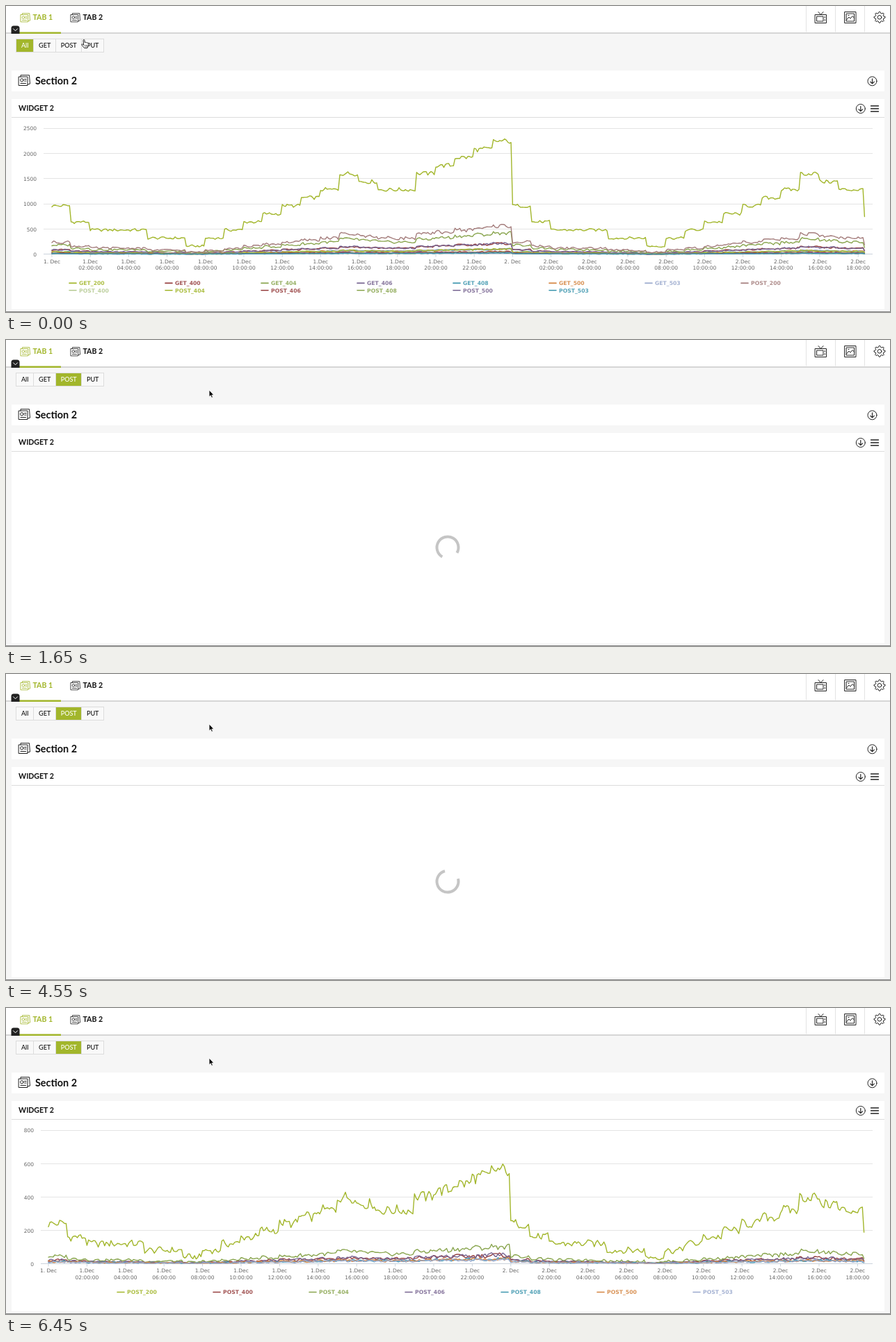
An HTML page that plays this animation: 1271x441 px, repeating every 6650 ms.

```html
<!DOCTYPE html>
<html lang="en">
<head>
<meta charset="utf-8">
<title>Dashboard filter</title>
<style>
  html, body { margin: 0; width: 100%; height: 100%; overflow: hidden; background: #f6f6f6; }
  svg { display: block; width: 100%; height: 100%; }
  text { font-family: Lato, "Open Sans", sans-serif; fill: #111; }
  .chart text { font: 7.5px "DejaVu Sans", Verdana, sans-serif; fill: #666; }
  .chart .key { font-weight: bold; font-size: 7.7px; fill-opacity: .88; }
  .line { fill: none; stroke: #222; stroke-linecap: round; stroke-linejoin: round; }
</style>
</head>
<body>
<svg id="stage" viewBox="0 0 1271 441" xmlns="http://www.w3.org/2000/svg"></svg>
<script>
const LOOP = 6650, STEP = 50;
const CLICK = 300, SPIN_SHOWN = 350, SPIN_START = 500, LOADED = 5450;
const REVEAL_START = 5434, REVEAL_TIME = 1000;
const GREEN = '#a2b62b';
const PALETTE = [GREEN, '#963f3f', '#89a54e', '#776491', '#3d96ae', '#d48440', '#9aa9cd', '#a47d7c', '#b5ca92'];
const stage = document.getElementById('stage');

function add(parent, tag, attrs, content) {
  const node = document.createElementNS('http://www.w3.org/2000/svg', tag);
  for (const key in attrs) node.setAttribute(key, attrs[key]);
  if (content !== undefined) node.textContent = content;
  parent.appendChild(node);
  return node;
}
const rect = (p, x, y, width, height, fill, more) => add(p, 'rect', { x, y, width, height, fill, ...more });
const path = (p, d, more) => add(p, 'path', { d, class: 'line', ...more });
const label = (p, x, y, content, more) => add(p, 'text', { x, y, ...more }, content);
const group = (p, x = 0, y = 0, more) => add(p, 'g', { transform: `translate(${x} ${y})`, ...more });
const show = (node, on) => node.setAttribute('visibility', on ? 'visible' : 'hidden');

// Page frame
function cardIcon(x, y, scale, color) {
  const g = group(stage, 0, 0, { transform: `translate(${x} ${y}) scale(${scale})` });
  const pen = { style: `stroke:${color}`, 'stroke-width': 1 };
  path(g, 'M1 3H13.5V15.5H1ZM3.5 3V.7L16 .7 17 13.2 13.5 14M9 6.5H11.5M9 9H11.5M3.5 12.5H11', pen);
  add(g, 'circle', { cx: 5.3, cy: 7.8, r: 2.2, class: 'line', ...pen });
}
function downloadIcon(x, y) {
  const g = group(stage, x, y);
  add(g, 'circle', { r: 6.5, class: 'line', 'stroke-width': 1 });
  path(g, 'M0 -3.5V3.5M-2.8 .8L0 3.6 2.8 .8', { 'stroke-width': 1.2 });
}
function gearIcon(x, y) {
  const points = [];
  for (let i = 0; i < 32; i++) {
    const a = (i - .5) * Math.PI / 16, r = i % 4 < 2 ? 8 : 6;
    points.push(`${(r * Math.cos(a)).toFixed(2)} ${(r * Math.sin(a)).toFixed(2)}`);
  }
  const g = group(stage, x, y);
  path(g, `M${points.join('L')}Z`);
  add(g, 'circle', { r: 2.8, class: 'line' });
}

rect(stage, 0, 0, 1271, 441, '#f6f6f6');
rect(stage, 0, 0, 1271, 38, '#fff');
rect(stage, 0, 38, 1271, 2, '#d6d6d6');
rect(stage, 8, 37.5, 71, 2.5, GREEN);
path(stage, 'M7.5 40V32Q7.5 28.5 11 28.5H16Q19.5 28.5 19.5 32V40Z', { style: 'fill:#222;stroke:none' });
path(stage, 'M10.5 32.8L13.5 35.8 16.5 32.8', { style: 'stroke:#fff' });
cardIcon(20.5, 10, .83, GREEN);
cardIcon(92.5, 10, .83, '#222');
label(stage, 38.5, 20.3, 'TAB 1', { 'font-size': 10.6, 'font-weight': 700, style: `fill:${GREEN}` });
label(stage, 110.5, 20.3, 'TAB 2', { 'font-size': 10.6, 'font-weight': 700 });
[1150, 1192, 1234].forEach(x => rect(stage, x, 0, 1, 37.5, '#e3e3e3'));
path(stage, 'M1163.5 12.5H1179.5V24.5H1163.5ZM1168 8.5L1171.5 12.5 1175 8.5M1166 15H1175V22H1166ZM1177.3 15.5V17M1177.3 19.5V21');
path(stage, 'M1206 8.5H1222V24.5H1206ZM1208.5 11H1219.5V22H1208.5ZM1208.5 20L1212 16 1214 18 1217 14.5 1219.5 17M1211 13.5H1212');
gearIcon(1256, 16.3);

rect(stage, 8, 93, 1255, 30, '#fff');
rect(stage, 8, 134, 1255, 303, '#fff');
rect(stage, 8, 160, 1255, 1, '#dcdcdc');
rect(stage, 0, 440, 1271, 1, '#8a8a8a');
cardIcon(17.5, 99, 1, '#222');
label(stage, 42, 113, 'Section 2', { 'font-size': 14.4, 'font-weight': 700 });
label(stage, 18, 150.5, 'WIDGET 2', { 'font-size': 10.6, 'font-weight': 700 });
downloadIcon(1245.5, 108.3);
downloadIcon(1228.8, 148);
[144, 148, 152].forEach(y => path(stage, `M1243.5 ${y}H1254.5`, { 'stroke-width': 1.4 }));

// Filter buttons
const buttons = [['All', 15, 25], ['GET', 40, 32], ['POST', 72, 37], ['PUT', 109, 32]].map(([name, x, width]) => ({
  name,
  box: rect(stage, x - .5, 47.5, width, 19, '#f9f9f9', { stroke: '#dcdcdc' }),
  text: label(stage, x + width / 2 - .3, 60.3, name, { 'font-size': 9.1, 'font-weight': 500, 'text-anchor': 'middle' })
}));

// Chart data: each weight is the traffic level of one hour of the day
const HOURS = [6, 4, 3, 3, 3, 2, 2, 1, 2, 3, 4, 5, 6, 7, 8, 10, 9, 8, 8, 10, 11, 12, 13, 14];
const SAMPLES = 508;

function random(i, seed) {
  const v = Math.sin(i * 12.9898 + seed * 78.233) * 43758.5453;
  return (v - Math.floor(v)) * 2 - 1;
}
function noise(t, seed) {
  const i = Math.floor(t), f = (1 - Math.cos((t - i) * Math.PI)) / 2;
  return random(i, seed) * (1 - f) + random(i + 1, seed) * f;
}
function sample(i, { scale, wobble, seed }) {
  const level = HOURS[Math.floor(i / 12) % 24] * scale;
  const value = level + noise(i / 1.4, seed) * (wobble[0] + wobble[1] * level);
  return Math.max(0, i === SAMPLES ? value * .58 : value);
}

function buildChart({ left, first, gap, base, top, max, tick, rows, series, legend }) {
  const g = group(stage, 0, 0, { class: 'chart' });
  const toY = v => base - v * (base - top) / max;
  for (let v = 0; v <= max; v += tick) {
    const y = Math.round(toY(v) - .5);
    rect(g, left, y, 1246 - left, 1, v ? '#e4e4e4' : '#cbd3dc');
    label(g, left - 10, toY(v) + 3.4, v, { 'text-anchor': 'end' });
  }
  for (let k = 0; k < 22; k++) {
    const x = first + k * gap, hour = k * 2 % 24, day = k < 12 ? 1 : 2;
    rect(g, x - .5, base, 1, 4, '#cbd3dc');
    label(g, x, rows[0], hour ? `${day}.Dec` : `${day}. Dec`, { 'text-anchor': 'middle' });
    if (hour) label(g, x, rows[1], `${String(hour).padStart(2, '0')}:00:00`, { 'text-anchor': 'middle' });
  }
  const clip = add(g, 'clipPath', { id: `reveal${max}` });
  const opening = rect(clip, left, top - 5, 1246 - left, base - top + 7, '#000');
  const plot = add(g, 'g', { 'clip-path': `url(#reveal${max})` });
  series.forEach(([name, scale, wobble], n) => {
    const color = PALETTE[n % PALETTE.length];
    const points = [];
    for (let i = 0; i <= SAMPLES; i++) {
      const y = toY(sample(i, { scale, wobble, seed: n + 1 }));
      points.push(`${(first + i * gap / 24).toFixed(1)} ${y.toFixed(1)}`);
    }
    path(plot, `M${points.join('L')}`, { style: `stroke:${color}`, 'stroke-width': 1.4 });
    const x = legend.x + n % 8 * 138, y = legend.y + Math.floor(n / 8) * 10.3;
    path(g, `M${x} ${y}H${x + 10}`, { style: `stroke:${color}`, 'stroke-width': 1.6 });
    label(g, x + 14, y + 2.9, name, { class: 'key', style: `fill:${color}` });
  });
  return { node: g, opening, left };
}

// Each series: name, units per weight, wobble as [fixed, share of level]
const small = [3, .25], medium = [8, .08];
const postSeries = [
  ['POST_200', 40, [18, .05]], ['POST_400', 3.6, small], ['POST_404', 7.3, [6, .12]], ['POST_406', 3.6, small],
  ['POST_408', 2, small], ['POST_500', 2.1, small], ['POST_503', 1.7, small]
];
const getSeries = [
  ['GET_200', 160, [22, .015]], ['GET_400', 15, medium], ['GET_404', 30, [16, .05]], ['GET_406', 15, medium],
  ['GET_408', 7.3, medium], ['GET_500', 7.3, medium], ['GET_503', 7.3, medium]
];
const allChart = buildChart({
  left: 54, first: 66, gap: 55.2, base: 357.7, top: 176, max: 2500, tick: 500, rows: [370.6, 380.4],
  legend: { x: 91, y: 399.4 },
  series: [...getSeries, ...postSeries.filter(([name]) => name !== 'POST_500' && name !== 'POST_503'),
    ...postSeries.slice(5)]
});
const postChart = buildChart({
  left: 50, first: 61, gap: 55.4, base: 368.4, top: 176, max: 800, tick: 200, rows: [381.4, 390.6],
  legend: { x: 160, y: 409.5 },
  series: postSeries
});

// Spinner: three quarters of a ring, the gap centred at the top
const spinner = group(stage, 635, 299);
path(spinner, 'M10.96 -10.96A15.5 15.5 0 1 1 -10.96 -10.96', {
  style: 'stroke:#c5c5c5;stroke-linecap:butt', 'stroke-width': 4
});

// Pointer
const hand = group(stage);
path(hand, 'M3 1.2C3 .2 4.8 .2 4.9 1.2L5.2 4.6C6 4 7 4.2 7.2 4.9 8 4.4 8.8 4.7 9 5.3 10 5 10.7 5.6 10.6 6.6L10.2 9.5 9 12.5H4.5L1 8.2C.2 7.2 1.4 6.3 2.3 7.1L3.4 8.2Z',
  { style: 'fill:#fff', 'stroke-width': 1 });
path(hand, 'M5.7 8.3V10.8M7.3 8.3V10.8M8.8 8.3V10.8', { 'stroke-width': .6 });
const arrow = group(stage);
path(arrow, 'M.5 .5V9.8L2.6 7.8 4.1 11.2 5.7 10.5 4.2 7.3H6.9Z', { style: 'fill:#000;stroke:#fff', 'stroke-width': .7 });

const POINTER = [[0, 108, 48], [300, 87, 57], [950, 87, 57], [1200, 109, 48], [1550, 291.6, 72]];

function pointerAt(t) {
  const next = POINTER.findIndex(p => p[0] > t);
  if (next < 0) return POINTER[POINTER.length - 1].slice(1);
  const [t0, x0, y0] = POINTER[next - 1], [t1, x1, y1] = POINTER[next];
  const u = (t - t0) / (t1 - t0), e = u * u * (3 - 2 * u);
  return [x0 + (x1 - x0) * e, y0 + (y1 - y0) * e];
}

function render(t) {
  const active = t < CLICK ? 'All' : 'POST';
  buttons.forEach(({ name, box, text }) => {
    const on = name === active;
    box.setAttribute('fill', on ? GREEN : '#f9f9f9');
    text.style.fill = on ? '#fff' : '#111';
  });

  show(allChart.node, t < CLICK);
  show(postChart.node, t >= LOADED);
  const u = Math.min(1, Math.max(0, (t - REVEAL_START) / REVEAL_TIME));
  const reveal = (1 - Math.cos(Math.PI * u)) / 2;
  postChart.opening.setAttribute('width', (1246 - postChart.left) * reveal);

  show(spinner, t >= SPIN_SHOWN && t < LOADED);
  const angle = 7.5 + Math.max(0, t - SPIN_START) * .45;
  spinner.setAttribute('transform', `translate(635 299) rotate(${angle % 360})`);

  const [x, y] = pointerAt(t);
  const onButton = x < 138;
  show(hand, onButton);
  show(arrow, !onButton);
  (onButton ? hand : arrow).setAttribute('transform', `translate(${x} ${y})`);
}

const start = performance.now();
function tick(now) {
  const t = Math.max(0, now - start) % LOOP;
  render(Math.floor(t / STEP) * STEP);
  requestAnimationFrame(tick);
}
render(0);
requestAnimationFrame(tick);
</script>
</body>
</html>
```
